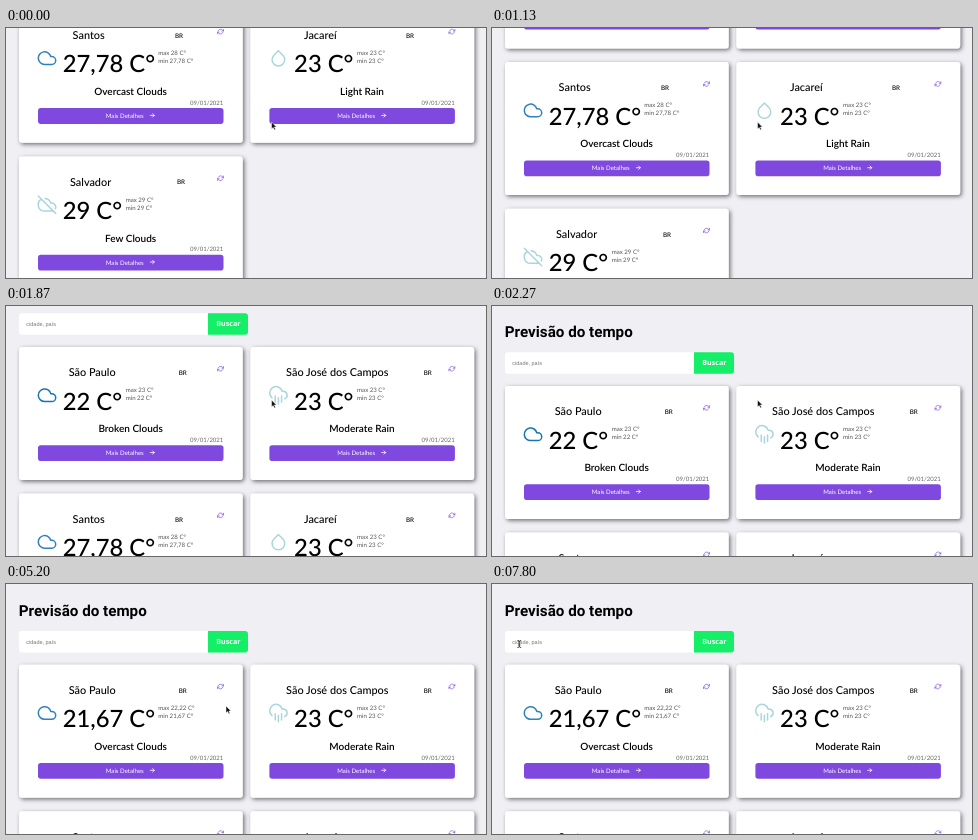
Recreate the animation shown at these times as an HTML page. Size 480 by 250 pixels, loop 8 s.

```html
<!DOCTYPE html>
<html lang="pt-BR">
<head>
<meta charset="utf-8">
<title>Previsão do tempo</title>
<style>
  html, body { margin: 0; width: 100%; height: 100%; overflow: hidden; background: #f0eff4; }
  svg { display: block; width: 480px; height: 250px; }
  text { font-family: Lato, sans-serif; text-rendering: geometricPrecision; fill: #000; }
  .title { font: 700 15.2px Roboto, sans-serif; }
  .hint { font: 5.5px "Liberation Sans", sans-serif; fill: #757575; }
  .search { font: 700 7.1px "Open Sans", sans-serif; fill: #fff; }
  .city { font-size: 10.9px; font-weight: 500; }
  .land { font-size: 6.3px; font-weight: 500; }
  .temp { font-size: 23.8px; font-weight: 500; }
  .note { font-size: 6.1px; fill: #555; }
  .desc { font-size: 10px; font-weight: 600; text-anchor: middle; }
  .date { font-size: 6px; fill: #666; text-anchor: end; }
  .more { font-size: 6.1px; fill: #fff; }
  .line { fill: none; stroke-linecap: round; stroke-linejoin: round; }
</style>
</head>
<body>
<svg id="stage" viewBox="0 0 480 250">
  <defs>
    <filter id="shadow" x="-10%" y="-10%" width="120%" height="125%">
      <feDropShadow dx="1.6" dy="1.6" stdDeviation="2" flood-color="#000" flood-opacity=".55"/>
    </filter>
  </defs>
  <rect width="480" height="250" fill="#f0eff4"/>
  <g id="page">
    <text class="title" x="12.8" y="31.5">Previsão do tempo</text>
    <path d="M16 47H202V68.5H16a3 3 0 0 1-3-3V50a3 3 0 0 1 3-3z" fill="#fff"/>
    <path d="M202 47H239a3 3 0 0 1 3 3V65.500a3 3 0 0 1-3 3H202z" fill="#14ef67"/>
    <text class="hint" x="20.3" y="59.800">cidade, país</text>
    <text class="search" x="210.300" y="60.200">Buscar</text>
    <g id="cards"></g>
  </g>
  <path id="arrow" d="M0 0V7L1.7 5.500L2.800 7.900L4 7.300L2.900 5H5z" fill="#111" stroke="#fff" stroke-width=".5"/>
  <path id="beam" class="line" d="M-1.500-3.500Q0-3.500 0-2.500Q0-3.500 1.500-3.500M0-2.500V2.500M-1.500 3.500Q0 3.500 0 2.500Q0 3.500 1.500 3.500M-.8 .9H.8" stroke="#222" stroke-width=".8"/>
</svg>
<script>
const LOOP = 8000, COL = 231.4, ROW = 146.6, REFRESH_AT = 4530;
const $ = id => document.getElementById(id);

const icons = {
  cloud: 'M18 10h-1.26A8 8 0 1 0 9 20h9a5 5 0 0 0 0-10z',
  rain: 'M16 13v8M8 13v8M12 15v8M20 16.58A5 5 0 0 0 18 7h-1.26A8 8 0 1 0 4 15.25',
  drop: 'M12 2.69l5.66 5.66a8 8 0 1 1-11.31 0z',
  clear: 'M22.61 16.95A5 5 0 0 0 18 10h-1.26a8 8 0 0 0-7.05-6M5 5a8 8 0 0 0 4 15h9a5 5 0 0 0 1.7-.3M1 1l22 22',
  refresh: 'M23 4v6h-6M1 20v-6h6M3.51 9a9 9 0 0 1 14.85-3.36L23 10M1 14l4.64 4.36A9 9 0 0 0 20.49 15'
};

const blue = '#2f81bd', teal = '#a9d6dc';
const cities = [
  { name: 'São Paulo', x: 62.7, land: 172.7, icon: 'cloud', color: '#1576b2',
    temp: '22 C°', max: '23', min: '22', noteX: 119.7, desc: 'Broken Clouds' },
  { name: 'São José dos Campos', x: 48.7, land: 186.3, icon: 'rain', color: teal,
    temp: '23 C°', max: '23', min: '23', noteX: 119.7, desc: 'Moderate Rain' },
  { name: 'Santos', x: 66.6, land: 169, icon: 'cloud', color: blue,
    temp: '27,78 C°', max: '28', min: '27,78', noteX: 152.2, desc: 'Overcast Clouds' },
  { name: 'Jacareí', x: 66.6, land: 168.6, icon: 'drop', color: teal,
    temp: '23 C°', max: '23', min: '23', noteX: 119.7, desc: 'Light Rain' },
  { name: 'Salvador', x: 64, land: 171, icon: 'clear', color: teal,
    temp: '29 C°', max: '29', min: '29', noteX: 119.7, desc: 'Few Clouds' }
];
const updated = { ...cities[0], color: blue, temp: '21,67 C°', max: '22,22', min: '21,67',
  noteX: 152.2, desc: 'Overcast Clouds' };

const text = (cls, x, y, s) => `<text class="${cls}" x="${x}" y="${y}">${s}</text>`;
const icon = (name, cx, cy, k, color, w) =>
  `<path class="line" d="${icons[name]}" stroke="${color}" stroke-width="${w}"
    transform="translate(${cx} ${cy}) scale(${k}) translate(-12 -12)"/>`;

const weather = c =>
  icon(c.icon, 41, 129, .79, c.color, 1.9) +
  text('temp', 56.7, 143.3, c.temp) +
  text('note', c.noteX, 126, `max ${c.max} C°`) +
  text('note', c.noteX, 134, `min ${c.min} C°`) +
  text('desc', 124.6, 166, c.desc);

const card = (c, i) =>
  `<g transform="translate(${i % 2 * COL} ${Math.floor(i / 2) * ROW})">
    <rect x="13" y="80.700" width="223.700" height="133" rx="3" fill="#fff" filter="url(#shadow)"/>` +
  text('city', c.x, 110, c.name) +
  text('land', c.land, 108.8, 'BR') +
  icon('refresh', 214.5, 102.5, .27, '#7f48de', 2.4) +
  `<g class="weather">${weather(c)}</g>` +
  text('date', 217.3, 175.6, '09/01/2021') +
  `<rect x="32" y="179" width="185.500" height="15.800" rx="2.800" fill="#7f48de"/>` +
  text('more', 99.8, 189, 'Mais Detalhes') +
  `<path class="line" d="M144.300 186.300h4m-1.700-1.700l1.700 1.700l-1.700 1.700" stroke="#fff" stroke-width=".8"/></g>`;

$('cards').innerHTML = cities.map(card).join('');
const first = document.querySelector('.weather');

// Ease-out from a to b between t0 and t1
const glide = (t, t0, t1, a, b, p) => {
  const u = Math.min(1, Math.max(0, (t - t0) / (t1 - t0)));
  return b + (a - b) * (1 - u) ** p;
};

function scrollAt(t) {
  if (t < 970) return glide(t, 0, 470, 245.5, 247, 2);
  if (t < 1700) return glide(t, 970, 1600, 247, 104, 1.6);
  return glide(t, 1700, 2500, 104, 0, 4);
}

// Pointer stops: time, x, y
const stops = [
  [0, 265.5, 94], [2700, 265.5, 94], [3500, 213.5, 101.5], [5130, 213.5, 101.5],
  [5200, 220, 122], [5600, 186, 140], [6020, 112, 127], [6350, 8, 92], [6600, 27.3, 60], [LOOP, 27.3, 60]
];

function pointerAt(t) {
  const i = stops.findIndex(s => s[0] > t);
  const [t0, x0, y0] = stops[i - 1], [t1, x1, y1] = stops[i];
  const u = (t - t0) / (t1 - t0), e = u * u * (3 - 2 * u);
  return [x0 + (x1 - x0) * e, y0 + (y1 - y0) * e];
}

let shown = cities[0];
function draw(t) {
  $('page').setAttribute('transform', `translate(0 ${-scrollAt(t)})`);
  const now = t < REFRESH_AT ? cities[0] : updated;
  if (now !== shown) first.innerHTML = weather(shown = now);

  const [x, y] = pointerAt(t);
  const typing = t > 6350 && x > 13 && y < 68;
  $('arrow').style.display = typing ? 'none' : '';
  $('beam').style.display = typing ? '' : 'none';
  $(typing ? 'beam' : 'arrow').setAttribute('transform', `translate(${x} ${y})`);
}

const start = performance.now();
function tick() {
  draw((performance.now() - start) % LOOP);
  requestAnimationFrame(tick);
}
draw(0);
requestAnimationFrame(tick);
</script>
</body>
</html>
```
